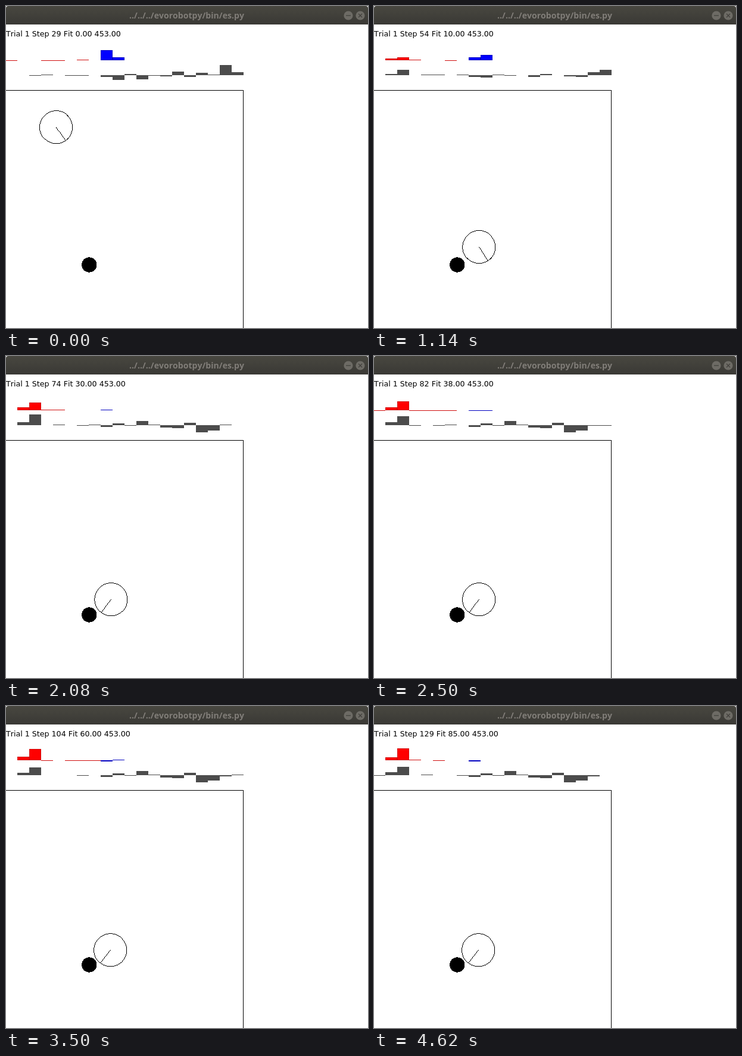
Recreate the animation shown at these times as an HTML page with a canvas. Size 608 px wide and 540 px high, loop 4.64 s.

```html
<!DOCTYPE html>
<html lang="en">
<head>
<meta charset="utf-8">
<title>Robot simulation</title>
<style>
html, body { margin: 0; width: 100%; height: 100%; overflow: hidden; background: #fff; }
canvas { display: block; }
</style>
</head>
<body>
<canvas id="stage" width="608" height="540"></canvas>
<script>
const ctx = document.getElementById('stage').getContext('2d');
const LOOP = 4640;
const BURST = 560, MOVING = 460, FIRST_BURST = 120, TICK = 20;
const RADIUS = 27.5;

// Simulation pace: time in ms, step
const pace = [[0, 29], [1660, 65], [2500, 82], [3060, 94], [4620, 129]];

// Approach, turn and rest beside the ball: step, x, y, heading in degrees
const path = [
  [44, 125.3, 330.3, 57], [54, 176.3, 404, 57], [61, 176.7, 408.2, 127],
  [82, 176.2, 408.2, 126], [94, 175.2, 409.3, 128]
];

// Hidden neuron levels while driving and while touching the ball
const DRIVING = [-3, -8, 2, -7, -1, -2, 6, -3, 4, 1];
const TOUCHING = [-3, 3, -1, 7, 1, -4, -5, 4, -12, -9];

const RED = { fill: '#f00', edge: '#d01010' };
const BLUE = { fill: '#00f', edge: '#0000c0' };
const GREY = { fill: '#4c4c4c', edge: '#4c4c4c' };

const lerp = (a, b, u) => a + (b - a) * u;
const ramp = (v, from, to) => Math.min(1, Math.max(0, (v - from) / (to - from)));
const rad = deg => deg * Math.PI / 180;
const noise = (a, b) => {
  const v = Math.sin(a * 12.9898 + b * 78.233) * 43758.5453;
  return (v - Math.floor(v)) * 2 - 1;
};

// Linear interpolation of rows keyed by their first entry
function along(keys, at) {
  let i = 0;
  while (i < keys.length - 2 && at >= keys[i + 1][0]) i++;
  const [a, b] = [keys[i], keys[i + 1]];
  const u = ramp(at, a[0], b[0]);
  return a.slice(1).map((v, k) => lerp(v, b[k + 1], u));
}

// The picture freezes at the end of each burst while the simulation runs on
function stepAt(time) {
  const start = Math.floor((time - FIRST_BURST) / BURST) * BURST + FIRST_BURST;
  const shown = Math.floor(Math.min(time, start + MOVING) / TICK) * TICK;
  return Math.round(along(pace, shown)[0]);
}

function hermite(p, q, m, n, u) {
  const v = u * u, w = v * u;
  return {
    at: (2 * w - 3 * v + 1) * p + (w - 2 * v + u) * m + (3 * v - 2 * w) * q + (w - v) * n,
    slope: 6 * (v - u) * (p - q) + (3 * v - 4 * u + 1) * m + (3 * v - 2 * u) * n
  };
}

function poseAt(step) {
  if (step < 44) {
    const u = ramp(step, 29, 44), a = rad(54), b = rad(57), pull = 133;
    const x = hermite(84, 125.3, pull * Math.cos(a), pull * Math.cos(b), u);
    const y = hermite(203.2, 330.3, pull * Math.sin(a), pull * Math.sin(b), u);
    return [x.at, y.at, Math.atan2(y.slope, x.slope)];
  }
  const [x, y, heading] = along(path, step);
  return [x, y, rad(heading)];
}

function levelsAt(step) {
  const drive = ramp(step, 29, 44), touch = ramp(step, 50, 60);
  const flicker = seed => 1.2 * noise(step, seed);
  const sensors = (seed, side, front) => Array.from({ length: 8 }, (_, i) =>
    flicker(seed + i) + touch * ([0, side, front][i] || 0));
  const motors = [
    lerp(lerp(17, 10, drive), 3 * noise(step, 1), touch),
    lerp(lerp(5, 15, drive), flicker(2), touch)
  ];
  const hidden = DRIVING.map((level, i) => lerp(level, TOUCHING[i], touch));
  return {
    sensors: sensors(10, 5, lerp(14, 20, ramp(step, 82, 94))),
    motors,
    neurons: [...sensors(30, 4, lerp(21, 14, ramp(step, 65, 82))), ...hidden, ...motors]
  };
}

function rect(color, x, y, w, h) {
  ctx.fillStyle = color;
  ctx.fillRect(x, y, w, h);
}

// Unsmoothed one-pixel drawing
const plot = (x, y) => rect('#000', Math.floor(x), Math.floor(y), 1, 1);

function ring(cx, cy, r) {
  const reach = Math.ceil(r * Math.SQRT1_2);
  for (let k = -reach; k <= reach; k++) {
    const off = Math.sqrt(r * r - k * k);
    for (const side of [-off, off]) {
      plot(cx + k, cy + side);
      plot(cx + side, cy + k);
    }
  }
}

function ray(x, y, angle, length) {
  const dx = Math.cos(angle) * length, dy = Math.sin(angle) * length;
  const count = Math.ceil(Math.max(Math.abs(dx), Math.abs(dy)));
  for (let i = 0; i < count; i++) plot(x + dx * i / count, y + dy * i / count);
}

function disc(cx, cy, r) {
  for (let y = Math.floor(cy - r); y < cy + r; y++) {
    const half = Math.sqrt(Math.max(0, r * r - (y + 0.5 - cy) ** 2));
    const left = Math.round(cx - half);
    rect('#000', left, y, Math.round(cx + half) - left, 1);
  }
}

function bars(levels, column, base, { fill, edge }) {
  levels.forEach((level, i) => {
    const h = Math.round(level), size = Math.abs(h);
    const x = (column + i) * 20 - 1, y = base - Math.max(h, 0);
    rect(edge, x, y, 20, size);
    if (size > 2) rect(fill, x + 1, y + 1, 18, size - 2);
  });
}

function button(x, strokes) {
  ctx.fillStyle = '#6d6b65';
  ctx.beginPath();
  ctx.arc(x, 16, 7.6, 0, 7);
  ctx.fill();
  ctx.strokeStyle = '#42413c';
  ctx.lineWidth = 1.3;
  ctx.beginPath();
  for (const [x1, y1, x2, y2] of strokes) {
    ctx.moveTo(x + x1, 16 + y1);
    ctx.lineTo(x + x2, 16 + y2);
  }
  ctx.stroke();
}

function titleBar() {
  const shade = ctx.createLinearGradient(0, 0, 0, 31);
  shade.addColorStop(0, '#484740');
  shade.addColorStop(1, '#3a3935');
  ctx.fillStyle = shade;
  ctx.beginPath();
  ctx.roundRect(0, 0, 608, 31, [4, 4, 0, 0]);
  ctx.fill();
  ctx.fillStyle = '#807d78';
  ctx.font = 'bold 14.1px "Open Sans", sans-serif';
  ctx.textAlign = 'center';
  ctx.fillText('../../../evorobotpy/bin/es.py', 303.5, 21);
  button(575, [[-4, 0, 4, 0]]);
  button(595, [[-3, -3, 3, 3], [-3, 3, 3, -3]]);
}

function draw(time) {
  const step = stepAt(time);
  rect('#fff', 0, 0, 608, 540);
  titleBar();

  ctx.fillStyle = '#000';
  ctx.font = '12.65px "DejaVu Sans", sans-serif';
  ctx.textAlign = 'left';
  ctx.fontKerning = 'none';
  const fit = Math.max(0, step - 44).toFixed(2);
  ctx.fillText(`Trial 1 Step ${step} Fit ${fit} 453.00`, 0, 51);

  const { sensors, motors, neurons } = levelsAt(step);
  bars(sensors, 0, 91, RED);
  bars(motors, 8, 91, BLUE);
  bars(neurons, 0, 116, GREY);

  rect('#000', 0, 141, 399, 1);
  rect('#000', 398, 141, 1, 399);
  disc(139.75, 434, 12.6);
  const [x, y, heading] = poseAt(step);
  ring(x, y, RADIUS);
  ray(x, y, heading, RADIUS);
}

const begin = performance.now();
function tick() {
  draw((performance.now() - begin) % LOOP);
  requestAnimationFrame(tick);
}
tick();
</script>
</body>
</html>
```
